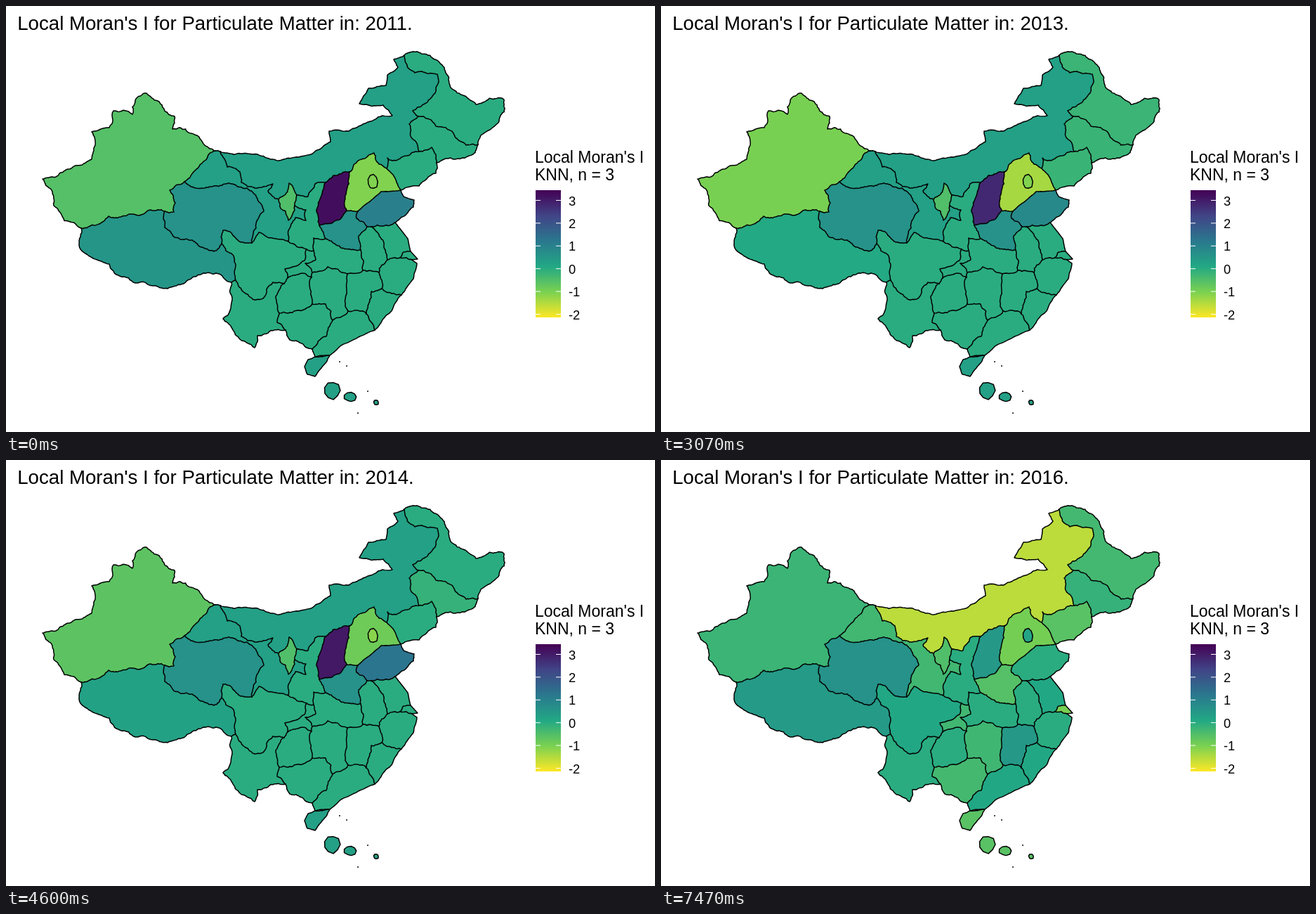
These frames come from a looping animation (924x606 px, 8 s). An HTML page with a canvas:

```html
<!DOCTYPE html>
<html lang="en">
<head>
<meta charset="utf-8">
<title>Local Moran's I</title>
<style>
html, body { margin: 0; width: 100%; height: 100%; overflow: hidden; background: #fff; }
canvas { display: block; width: 924px; height: 606px; }
</style>
</head>
<body>
<canvas id="stage" width="924" height="606"></canvas>
<script>
const ctx = document.getElementById('stage').getContext('2d');
const FONT = '"Liberation Sans", Arial, sans-serif';
const LOOP = 8000;
const MAP_CUTS = [1470, 3000, 4530, 6000, 7400];
const YEAR_CUTS = [1530, 3070, 4600, 6070, 7470];
const RAMP = ['440154', '414487', '2a788e', '22a884', '7ad151', 'fde725'];
const TOP = 3.45, BOTTOM = -2.14;

let seed = 7;
const random = () => (seed = (seed * 16807) % 2147483647) / 2147483647;
const point = text => text.split(',').map(Number);

// Midpoint displacement: turns a straight stretch into a ragged border.
function ragged(a, b, amount) {
  const dx = b[0] - a[0], dy = b[1] - a[1];
  if (Math.hypot(dx, dy) < 4) return [b];
  const off = (random() - 0.5) * 2 * amount;
  const mid = [(a[0] + b[0]) / 2 - dy * off, (a[1] + b[1]) / 2 + dx * off];
  return [...ragged(a, mid, amount), ...ragged(mid, b, amount)];
}
const roughen = (points, amount) =>
  points.slice(1).reduce((out, p, i) => out.concat(ragged(points[i], p, amount)), [points[0]]);

// Corners where borders meet, named a-z, A-Z, 0 in order.
const corners = {};
('107,316 298,206 254,250 226,292 321,393 307,338 327,390 350,337 402,335 428,346 388,275 414,269 411,284 ' +
 '305,207 567,70 587,157 672,197 613,223 588,207 542,231 489,236 562,262 501,292 485,291 455,251 446,312 ' +
 '455,331 438,348 505,347 514,314 520,314 554,308 543,361 561,358 576,349 578,361 563,411 535,402 531,379 ' +
 '508,376 486,381 436,379 401,387 435,386 436,424 389,437 396,395 398,461 436,488 465,447 487,434 513,438 525,461')
  .split(' ').forEach((p, i) => {
    corners['abcdefghijklmnopqrstuvwxyzABCDEFGHIJKLMNOPQRSTUVWXYZ0'[i]] = point(p);
  });

// A border belongs to one region (outer edge) or to two neighbours.
const borders = [];
function border(regions, route, amount = 0.14) {
  const points = route.split(' ').map(p => corners[p] || point(p));
  borders.push({ regions: regions.split(' '), points: roughen(points, amount) });
}

// West
border('XJ', 'a 68,284 65,262 52,246 84,234 122,218 127,198 122,179 147,173 153,149 180,154 184,134 200,124 216,135 240,157 237,175 272,184 b');
border('XJ GS', 'b 283,220 267,236 c');
border('XJ QH', 'c 233,262 241,280 239,293 d');
border('XJ XZ', 'd 206,290 180,296 146,299 a');
border('XZ', 'a 104,340 124,359 147,367 184,394 213,398 230,402 270,385 303,381 e');
border('XZ QH', 'd 226,315 240,329 272,338 296,349 f');
border('XZ SC', 'f 323,354 g');
border('XZ YN', 'g e');
border('QH GS', 'c 283,259 322,253 358,274 367,292 356,316 h');
border('QH SC', 'f 309,319 330,333 h');
border('GS SC', 'h 360,322 384,331 i');

// North
border('GS', 'b n');
border('GS NM', 'n 315,229 333,236 335,251 354,259 380,253 373,263 k');
border('GS NX', 'k 391,288 398,292 402,305 408,296 m');
border('GS SN', 'm 427,290 427,305 412,301 404,316 i');
border('NX NM', 'k 398,268 403,252 l');
border('NX SN', 'l m');
border('NM', 'n 344,210 388,220 434,211 462,193 460,178 488,178 536,156 550,156 537,141 503,139 516,117 541,113 543,98 558,87 552,76 o', 0.08);
border('NM HL', 'o 570,82 582,95 614,97 608,127 579,149 p');
border('HL', 'o 588,66 617,80 634,117 669,140 709,133 701,166 676,184 q');
border('HL JL', 'p 612,171 637,181 655,198 q');
border('JL', 'q 665,211 640,218 r');
border('JL NM', 'p 574,168 576,185 s');
border('JL LN', 's 606,201 r');
border('LN', 'r 612,238 588,256 v');
border('LN NM', 's 571,213 550,220 543,216 t');
border('LN HE', 't 551,240 v', 0.05);
border('HE NM', 't 531,225 524,209 511,217 495,226 u');
border('HE SX', 'u 486,258 x');
border('HE HA', 'x w');
border('HE SD', 'w 530,268 534,264 v', 0.03);
border('SX NM', 'u 466,241 y');
border('SX SN', 'y 449,270 z');
border('SX HA', 'z 477,302 x');
border('SN NM', 'l 430,271 440,253 y');

// Centre
border('SN SC', 'i j');
border('SN CQ', 'j B');
border('SN HB', 'B 438,330 A');
border('SN HA', 'z A');
border('HA HB', 'A 470,340 C');
border('HA AH', 'C 502,327 D');
border('HA SD', 'w 499,302 D');
border('SD AH', 'D E');
border('SD JS', 'E F');
border('SD', 'v 566,271 581,276 580,286 F', 0.08);
border('JS', 'F 572,331 I', 0.02);
border('JS AH', 'E 531,325 538,343 G');
border('JS ZJ', 'G H');
border('JS SH', 'H 566,350 I');
border('SH', 'I 586,360 J', 0);
border('SH ZJ', 'J H');
border('ZJ', 'J 585,366 580,388 K', 0.05);
border('ZJ FJ', 'K 549,409 L');
border('ZJ JX', 'L M');
border('ZJ AH', 'M G');
border('AH JX', 'M N');
border('AH HB', 'C 509,362 N');
border('HB JX', 'N O');
border('HB HN', 'O 458,371 P');
border('HB CQ', 'B 441,361 426,366 P');
border('CQ SC', 'j 425,362 397,374 Q');
border('CQ GZ', 'Q 418,381 R');
border('CQ HN', 'P R');

// South
border('GZ HN', 'R 434,405 S');
border('GZ GX', 'S T');
border('GZ YN', 'T 384,413 U');
border('GZ SC', 'U Q');
border('SC YN', 'g 351,417 366,416 380,393 U');
border('YN', 'e 322,418 309,445 333,474 354,486 358,469 V');
border('YN GX', 'T 386,450 V');
border('GX', 'V 404,475 W');
border('GX GD', 'W 456,470 X');
border('GX HN', 'S 455,424 X');
border('HN GD', 'X Y');
border('HN JX', 'O 485,405 Y');
border('JX GD', 'Y Z');
border('JX FJ', 'Z 520,406 L');
border('FJ GD', 'Z 0');
border('FJ', 'K 549,434 0', 0.06);
border('GD', '0 477,483 461,497 440,499 W', 0.05);

function trace(points, closed) {
  const path = new Path2D();
  points.forEach(([x, y]) => path.lineTo(x, y));
  if (closed) path.closePath();
  return path;
}

// Joins a region's borders corner to corner into one ring.
function ringOf(code) {
  const rest = borders.filter(b => b.regions.includes(code)).map(b => b.points);
  const ring = [...rest.shift()];
  while (rest.length) {
    const end = ring[ring.length - 1];
    const i = rest.findIndex(p => p[0] === end || p[p.length - 1] === end);
    const [next] = rest.splice(i, 1);
    ring.push(...(next[0] === end ? next : [...next].reverse()));
  }
  return ring;
}

function blob(code, x, y, rx, ry) {
  const points = [];
  for (let i = 0; i < 9; i++) {
    const a = i / 9 * Math.PI * 2, r = 0.85 + random() * 0.25;
    points.push([x + Math.cos(a) * rx * r, y + Math.sin(a) * ry * r]);
  }
  return { code, path: trace(points, true) };
}

const codes = [...new Set(borders.flatMap(b => b.regions))];
const areas = codes.map(code => ({ code, path: trace(ringOf(code), true) }));
const lines = borders.map(b => trace(b.points));
const hainan = '430,503 440,499 461,497 449,515 440,527 429,524 425,513 430,503'.split(' ').map(point);
const islands = [
  { code: 'HI', path: trace(roughen(hainan, 0.06), true) },
  blob('BJ', 522, 250, 7.5, 11),
  blob('HI', 464, 547, 11.5, 12.5),
  blob('HI', 490, 556, 8.5, 7),
  blob('HI', 527, 564, 3.5, 3.5)
];
const dots = '475,506 485,512 515,548 501,579'.split(' ').map(point);

// Index per region, 0 unless given; each year lists only its changes.
const changes = [
  { XJ: -0.55, XZ: 0.54, QH: 0.62, GS: 0.28, NM: 0.28, HI: 0.28, NX: -0.5, SX: 3.25, HE: -1.07, BJ: -1.07, SD: 1.02, HA: 0.6 },
  { XJ: -1, XZ: 0.08, HL: -0.22, JL: -0.2, LN: -0.2, SX: 2.8, HE: -1.2, SD: 0.82 },
  { HE: -1.4 },
  { XJ: -0.65, XZ: 0.25, HL: 0, JL: -0.15, LN: 0, SX: 3.05, HE: -0.87, BJ: -1.15, SD: 1.27 },
  { XJ: -0.38, XZ: 0.42, NM: 0.15, SX: 3.45, SD: 1.17, HA: 0.75 },
  { XJ: -0.22, GS: -0.3, NM: -1.58, SX: 0.48, HE: -0.95, BJ: 0.2, LN: -0.6, HL: -0.33, SD: 0, HA: -0.55,
    SH: -1, JX: 0.48, HN: -0.28, GX: -0.35, CQ: -0.3, HI: -0.6, SC: 0.12, GD: 0.12, FJ: 0.12, JS: 0.12 }
];
const years = [];
changes.forEach((c, i) => years.push({ ...years[i - 1], ...c }));

function colour(value = 0) {
  const pos = (TOP - value) / (TOP - BOTTOM) * (RAMP.length - 1);
  const i = Math.min(RAMP.length - 2, Math.floor(pos)), k = pos - i;
  const channel = n => {
    const at = j => parseInt(RAMP[j].slice(n * 2, n * 2 + 2), 16);
    return Math.round(at(i) + (at(i + 1) - at(i)) * k);
  };
  return `rgb(${[0, 1, 2].map(channel)})`;
}

function write(text, x, y, size) {
  ctx.font = `${size}px ${FONT}`;
  ctx.fillStyle = '#000';
  ctx.fillText(text, x, y);
}

function drawMap(values) {
  const fill = ({ code, path }) => {
    ctx.fillStyle = colour(values[code]);
    ctx.fill(path);
  };
  ctx.strokeStyle = '#000';
  ctx.lineWidth = 1.5;
  ctx.lineJoin = ctx.lineCap = 'round';
  areas.forEach(fill);
  lines.forEach(path => ctx.stroke(path));
  islands.forEach(island => {
    fill(island);
    ctx.stroke(island.path);
  });
  ctx.fillStyle = '#000';
  dots.forEach(([x, y]) => ctx.fillRect(x - 0.8, y - 0.8, 1.7, 1.7));
}

function drawLegend() {
  write("Local Moran's I", 753, 223, 23);
  write('KNN, n = 3', 753, 248, 23);
  const bar = ctx.createLinearGradient(0, 262, 0, 443);
  RAMP.forEach((c, i) => bar.addColorStop(i / (RAMP.length - 1), '#' + c));
  ctx.fillStyle = bar;
  ctx.fillRect(754, 262, 36, 181);
  for (let v = 3; v >= -2; v--) {
    const y = 373.7 - v * 32.4;
    ctx.fillStyle = '#fff';
    ctx.fillRect(754, y - 0.5, 7, 1);
    ctx.fillRect(783, y - 0.5, 7, 1);
    write(String(v), 801, y + 7, 18.3);
  }
}

const stepAt = (cuts, t) => cuts.filter(c => t >= c).length;

function frame() {
  const t = performance.now() % LOOP;
  ctx.fillStyle = '#fff';
  ctx.fillRect(0, 0, 924, 606);
  drawMap(years[stepAt(MAP_CUTS, t)]);
  write(`Local Moran's I for Particulate Matter in: ${2011 + stepAt(YEAR_CUTS, t)}.`, 16.2, 34, 27.65);
  drawLegend();
  requestAnimationFrame(frame);
}
frame();
</script>
</body>
</html>
```
